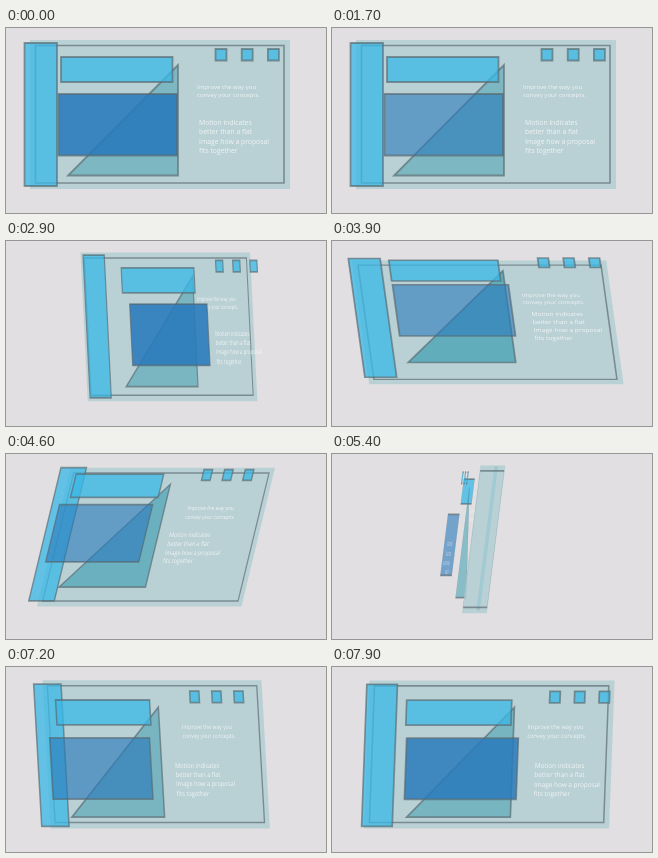
These frames come from a looping animation (320 px wide and 185 px high, 8 s). An HTML page with a canvas:

```html
<!DOCTYPE html>
<html lang="en">
<head>
<meta charset="utf-8">
<title>Layered slide</title>
<style>
  html, body { margin: 0; width: 100%; height: 100%; overflow: hidden; background: #e1dfe1; }
  canvas { display: block; }
</style>
</head>
<body>
<canvas width="320" height="185"></canvas>
<script>
const ctx = document.querySelector('canvas').getContext('2d');
const { sin, cos, abs, max, min } = Math;
const CX = 160, CY = 86, LOOP = 8000, STEP = 100;
const PAGE = '#e1dfe1', CYAN = 'rgba(58,184,230,.76)', EDGE = 'rgba(88,104,110,.66)';

// turning points of the drag: [time, angle]
const yawPath = [[1700, 0], [1800, .3], [2900, .86], [3900, .21], [5400, -1.667], [6500, -1.477], [7900, .34]];
const pitchPath = [[2500, 0], [2900, .065], [3900, .59], [5400, .125], [6500, -.1], [7900, -.11]];

// each segment adds its share of the change, so the ends hold
const follow = (path, t) => path.slice(1).reduce((v, [t1, v1], i) => {
  const [t0, v0] = path[i];
  return v + (v1 - v0) * min(1, max(0, (t - t0) / (t1 - t0)));
}, path[0][1]);

const panelAlpha = t => .6 + .28 * max(0, ...[0, 2900, LOOP].map(peak => 1 - abs(t - peak) / 900));

function shape(points, fill, edge = EDGE, width = 1.8) {
  ctx.beginPath();
  points.forEach(([x, y]) => ctx.lineTo(x, y));
  ctx.closePath();
  if (fill) { ctx.fillStyle = fill; ctx.fill(); }
  if (edge) { ctx.strokeStyle = edge; ctx.lineWidth = width; ctx.stroke(); }
}

const box = (x, y, w, h, ...style) =>
  shape([[x, y], [x + w, y], [x + w, y + h], [x, y + h]], ...style);

function text(lines, x, y, size, leading) {
  ctx.font = `${size}px "Open Sans", sans-serif`;
  ctx.fillStyle = 'rgba(255,255,255,.8)';
  lines.forEach((s, i) => ctx.fillText(s, x, y + i * leading));
}

// depth and drawing of each layer, back to front
const layers = [
  [9, () => {
    box(24, 12, 260, 149, 'rgba(176,206,209,.8)', null);
    box(29.5, 17.5, 248.5, 137.5, null, EDGE, 1.6);
  }],
  [16, () => text(['Improve the way you', 'convey your concepts.'], 191, 60.5, 6.1, 8.7)],
  [17, () => box(18.5, 15, 32.5, 143, CYAN)],
  [27, () => { for (let i = 0; i < 3; i++) box(209.5 + i * 26.2, 21, 11, 11.5, CYAN); }],
  [28, (t, pitch) => shape([[172, 37], [172, 147.5], [62, 147.5]],
    `rgba(65,160,178,${.5 + .4 * abs(sin(pitch))})`)],
  [35, () => box(55, 29, 111.5, 25, CYAN)],
  [36, () => text(['Motion indicates', 'better than a flat', 'Image how a proposal', 'fits together'], 193, 97, 6.8, 9.4)],
  [46, t => box(52.5, 66, 118.5, 61.5, `rgba(42,122,188,${panelAlpha(t)})`)]
];

function draw(t) {
  const yaw = follow(yawPath, t), pitch = follow(pitchPath, t);
  // the loop restarts from a flat view
  const cy = cos(yaw), sy = sin(yaw), cp = cos(pitch), sp = sin(pitch);
  ctx.resetTransform();
  ctx.fillStyle = PAGE;
  ctx.fillRect(0, 0, 320, 185);
  // seen from behind, the stacking is reversed
  const order = cy < 0 ? [...layers].reverse() : layers;
  for (const [z, paint] of order) {
    ctx.setTransform(cy, 0, sp * sy, cp, CX + z * cp * sy, CY - z * sp);
    ctx.translate(-CX, -CY);
    paint(t, pitch);
  }
}

const start = performance.now();
function tick() {
  const t = (performance.now() - start) % LOOP;
  draw(Math.floor(t / STEP) * STEP);
  requestAnimationFrame(tick);
}
tick();
</script>
</body>
</html>
```
